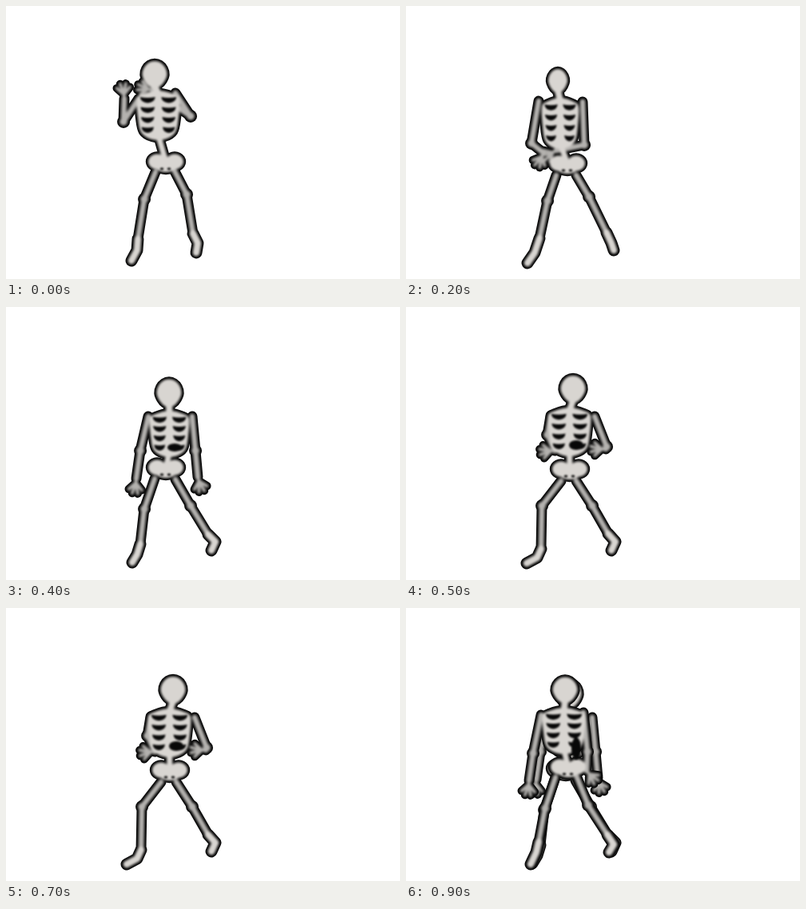
Recreate the animation shown at these times as an HTML page. Size 493x342 px, loop 1 s.

```html
<!DOCTYPE html>
<html lang="en">
<head>
<meta charset="utf-8">
<title>Dancing skeleton</title>
<style>
html, body { margin: 0; width: 100%; height: 100%; overflow: hidden; background: #fff; }
svg { display: block; width: 493px; height: 342px; }
path { stroke-linecap: round; stroke-linejoin: round; }
.line { fill: none; }
.ink path { stroke: #050505; }
.ink .flesh { fill: #050505; }
.bone .line { stroke: #b4b2af; }
.bone .line.pale { stroke: #d8d5d1; }
.bone .flesh { fill: #d8d5d1; }
.holes path { fill: #080808; }
</style>
</head>
<body>
<svg id="stage" viewBox="0 0 493 342" xmlns="http://www.w3.org/2000/svg">
  <defs>
    <filter id="edge" color-interpolation-filters="sRGB"><feGaussianBlur stdDeviation="0.4"/></filter>
    <filter id="glow" color-interpolation-filters="sRGB"><feGaussianBlur stdDeviation="1.4"/></filter>
    <filter id="hole" color-interpolation-filters="sRGB"><feGaussianBlur stdDeviation="0.8"/></filter>
  </defs>
</svg>
<script>
// head: x, y, rx, ry   chest: left, right, top, bottom   hips: x, y
// arms: shoulder, elbow, wrist, hand angle   legs: hip, knee, ankle, heel, toe
const raised = {
  head: [186, 86, 15.5, 17], chest: [164, 217, 106, 167], hips: [200, 195],
  arms: [[[166, 116], [147, 145], [148, 116], -95], [[212, 109], [231, 138], [183, 105], 190]],
  legs: [[[187, 208], [173, 242], [165, 292], [164, 306], [157, 319]],
         [[211, 207], [226, 236], [234, 285], [240, 297], [238, 309]]]
};
const crossed = {
  head: [190, 94, 12, 15], chest: [170, 216, 115, 178], hips: [202, 197],
  arms: [[[166, 119], [157, 172], [172, 184], 115], [[221, 120], [223, 174], [188, 181], 150]],
  legs: [[[188, 212], [177, 244], [167, 291], [161, 309], [152, 322]],
         [[213, 212], [229, 239], [251, 284], [257, 297], [260, 306]]]
};
const turned = {
  head: [199, 103, 15.5, 16.5], chest: [171, 224, 125, 182], hips: [203, 199], gap: [213, 176, 6, 14],
  arms: [[[169, 134], [159, 182], [154, 216], 95], [[222, 131], [227, 180], [226, 204], 50]],
  legs: [[[187, 212], [174, 251], [166, 293], [163, 306], [156, 321]],
         [[213, 210], [228, 247], [252, 284], [260, 296], [254, 306]]]
};
const front = {
  head: [204, 108, 15.5, 17.5], chest: [180, 229, 130, 187], hips: [200, 201], gap: [211, 176, 9, 5],
  arms: [[[178, 137], [168, 180], [163, 215], 95], [[233, 137], [237, 180], [240, 213], 75]],
  legs: [[[186, 215], [173, 253], [168, 297], [164, 310], [158, 320]],
         [[212, 216], [231, 249], [253, 285], [262, 294], [257, 305]]]
};
const bent = {
  head: [209, 103, 15.5, 17], chest: [178, 231, 126, 186], hips: [205, 203], gap: [213, 173, 9, 6],
  arms: [[[181, 136], [177, 160], [186, 180], 175], [[236, 137], [251, 175], [250, 178], 180]],
  legs: [[[194, 218], [170, 249], [169, 303], [164, 314], [151, 321]],
         [[213, 218], [233, 249], [253, 284], [262, 294], [257, 305]]]
};

// Mix two poses, number by number
function blend(a, b, t) {
  if (typeof a === 'number') return a + (b - a) * t;
  if (Array.isArray(a)) return a.map((v, i) => blend(v, b[i], t));
  return Object.fromEntries(Object.keys(a).filter(k => k in b).map(k => [k, blend(a[k], b[k], t)]));
}
const lowering = blend(raised, crossed, 0.5);
const rising = { ...blend(front, bent, 2), hips: bent.hips, legs: bent.legs };

// Smooth closed curve through the points
function blob(p) {
  const n = p.length, at = i => p[(i + n) % n];
  const ctrl = (a, b, c) => b.map((v, j) => v + (c[j] - a[j]) / 6);
  return `M${p[0]}` + p.map((b, i) => {
    const a = at(i - 1), c = at(i + 1), e = at(i + 2);
    return `C${ctrl(a, b, c)} ${ctrl(e, c, b)} ${c}`;
  }).join('') + 'Z';
}
const line = p => 'M' + p.join('L');
const oval = (x, y, rx, ry, taper = 0) => blob(Array.from({ length: 12 }, (_, i) => {
  const a = i * Math.PI / 6, s = Math.sin(a);
  return [x + rx * Math.cos(a) * (1 - taper * Math.max(0, s)), y + ry * s];
}));

function cage([l, r, t, b]) {
  const m = (l + r) / 2, w = (r - l) / 2, h = b - t;
  const half = [[0, 0], [0.7, 0.07], [1, 0.18], [0.96, 0.55], [0.8, 0.86], [0.3, 1]];
  const side = s => half.map(([u, v]) => [m + s * u * w, t + v * h]);
  return blob([...side(1), ...side(-1).slice(1).reverse()]);
}

function ribs([l, r, t, b]) {
  const out = [], w = r - l, h = b - t;
  for (let row = 0; row < 4; row++) {
    for (const side of [-1, 1]) {
      const x = (l + r) / 2 + side * w * 0.25, y = t + h * (0.13 + 0.205 * row);
      const d = w * 0.18 - row * 0.6;
      out.push(`M${x - d},${y}Q${x},${y + 2} ${x + d},${y}Q${x + d - 1},${y + 7} ${x},${y + 7.5}Q${x - d + 1},${y + 7} ${x - d},${y}Z`);
    }
  }
  return out;
}

// Four fingers fan out from a palm just beyond the wrist
function hand([x, y], angle) {
  const ray = (p, a, len) => [p[0] + len * Math.cos(a), p[1] + len * Math.sin(a)];
  const dir = angle * Math.PI / 180, palm = ray([x, y], dir, 5);
  return line([[x, y], palm]) + [-0.75, -0.25, 0.25, 0.75].map(k =>
    line([palm, ray(palm, dir + k, 15 - 4 * Math.abs(k))])).join('');
}

const path = (d, width, cls) => `<path class="${cls}" d="${d}" stroke-width="${width}"/>`;

function draw({ head, chest, hips, arms, legs, gap }) {
  const [hx, hy] = hips, mid = (chest[0] + chest[1]) / 2;
  const flesh = [
    oval(...head, 0.18), cage(chest),
    ...[-11, 11].map(dx => oval(hx + dx, hy, 11, 9.5)), oval(hx, hy + 6, 13, 7)
  ];
  const limbs = [...arms, ...legs].map(p => p.slice(0, 3));
  const strokes = [
    ...limbs.map(p => [line(p), 6.5, 'line']),
    ...limbs.map(p => [`M${p[1]}h.1`, 9.5, 'line']),
    ...arms.map(a => [hand(a[2], a[3]), 3.8, 'line']),
    ...legs.map(p => [line(p.slice(2)), 8.5, 'line pale']),
    [line([[mid, chest[3] - 5], hips]), 7, 'line pale'],
    [line([[head[0], head[1] + head[3] - 3], [mid, chest[2] + 4]]), 8, 'line pale']
  ];
  const dots = [-5, 4].map(dx => oval(hx + dx, hy + 9, 2.2, 1.4));
  const holes = [...ribs(chest), ...dots, ...(gap ? [oval(...gap)] : [])];
  const layer = (cls, blur, pad) => `<g class="${cls}" filter="url(#${blur})">`
    + strokes.map(([d, w, c]) => path(d, w + pad, c)).join('')
    + flesh.map(d => path(d, pad, 'flesh')).join('') + '</g>';
  return layer('ink', 'edge', 6.4) + layer('bone', 'glow', 0)
    + `<g class="holes" filter="url(#hole)">${holes.map(d => path(d, 0, '')).join('')}</g>`;
}

// One step every 100 ms; the last step keeps the previous pose behind it
const steps = [[raised], [lowering], [crossed], [turned], [front], [bent], [rising], [bent], [front], [front, turned]];
const stage = document.getElementById('stage');
const views = steps.map(poses => {
  const g = document.createElementNS('http://www.w3.org/2000/svg', 'g');
  g.innerHTML = poses.map(draw).join('');
  g.style.display = 'none';
  return stage.appendChild(g);
});

let shown = 0;
function show(step) {
  views[shown].style.display = 'none';
  views[step].style.display = '';
  shown = step;
}
const start = performance.now();
function tick() {
  const step = Math.floor((performance.now() - start) % 1000 / 100);
  if (step !== shown) show(step);
  requestAnimationFrame(tick);
}
show(0);
requestAnimationFrame(tick);
</script>
</body>
</html>
```
